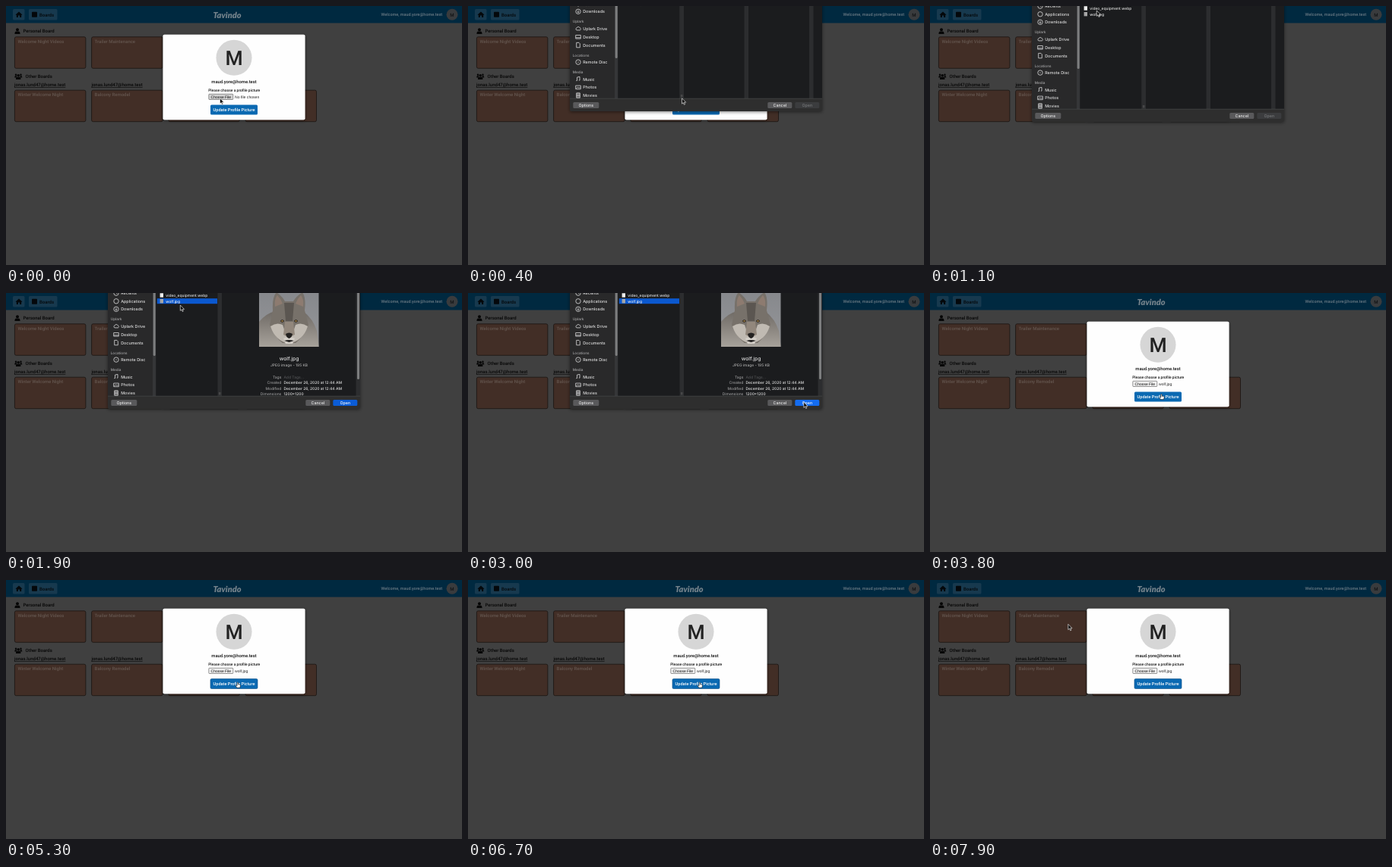
Animation of 600 by 342 pixels, one loop 8 s. Source, as an HTML page:

```html
<!DOCTYPE html>
<html lang="en">
<head>
<meta charset="utf-8">
<title>Profile picture upload</title>
<style>
  html, body { margin: 0; width: 100%; height: 100%; overflow: hidden; background: #404040; }
  svg { display: block; width: 100vw; height: 100vh; }
  text { font-family: Roboto, sans-serif; font-weight: 500; text-rendering: geometricPrecision; white-space: pre; }
  .mac text { font-family: Inter, sans-serif; }
  .arial { font-family: "Liberation Sans", sans-serif; font-weight: 400; }
  .logo { font-family: Lato, sans-serif; font-weight: 900; font-style: italic; }
</style>
</head>
<body>
<svg id="stage" viewBox="0 0 600 342" xmlns="http://www.w3.org/2000/svg">
  <defs>
    <filter id="shadow" x="-10%" y="-10%" width="120%" height="125%">
      <feDropShadow dx="0" dy="1" stdDeviation="2" flood-color="#000" flood-opacity=".5"/>
    </filter>
    <clipPath id="columns"><rect x="197" y="-60" width="269" height="196"/></clipPath>
    <clipPath id="sidebarClip"><rect x="134" y="-60" width="63" height="196"/></clipPath>
    <clipPath id="photoClip"><rect x="333" y="-7.5" width="78.5" height="78.5"/></clipPath>
    <linearGradient id="backdrop" x1="0" y1="0" x2="0" y2="1">
      <stop offset="0" stop-color="#85878b"/><stop offset="1" stop-color="#96979a"/>
    </linearGradient>
    <linearGradient id="coat" x1="0" y1="0" x2="0" y2="1">
      <stop offset="0" stop-color="#6f6a65"/><stop offset="1" stop-color="#a8a39c"/>
    </linearGradient>
  </defs>

  <g id="page">
    <rect width="600" height="342" fill="#404040"/>
    <rect width="600" height="22.5" fill="#002940"/>
    <g fill="#17394e">
      <rect x="9" y="4" width="15.5" height="14.5" rx="1.5"/>
      <rect x="30" y="4" width="37.5" height="14.5" rx="1.5"/>
    </g>
    <path d="M12.6 11.4 17 7.4l4.4 4-.6.6-.6-.5V15H18v-2.500h-2V15h-2.200v-3.500l-.6.5z" fill="#04080b"/>
    <rect x="34" y="7.700" width="7" height="7" rx=".8" fill="#04080b"/>
    <circle cx="587" cy="11.300" r="7.500" fill="#393b3d"/>
    <g id="people" fill="#060606">
      <circle cx="15" cy="31.300" r="2"/><path d="M11.500 37v-1.200q0-2.200 2.300-2.200h2.400q2.300 0 2.300 2.200V37z"/>
      <circle cx="16.200" cy="91.700" r="1.800"/><path d="M13 97v-1.200q0-2 2-2h2.400q2 0 2 2V97z"/>
      <circle cx="13" cy="90.800" r="1.200"/><circle cx="19.500" cy="90.800" r="1.200"/>
      <path d="M11.300 94.500v-.8q0-1.400 1.400-1.400h1.300v2.200zM21.200 94.500v-.8q0-1.400-1.400-1.400h-1.300v2.200z"/>
    </g>
  </g>

  <g id="modal">
    <rect x="206.500" y="37.800" width="187" height="112.500" rx="1.800" fill="#fefefe" filter="url(#shadow)"/>
    <circle cx="300" cy="68.300" r="23.500" fill="#d6d6d6"/>
    <rect id="fileButton" x="266.800" y="116.300" width="32" height="7.200" rx=".8" stroke="#555" stroke-width=".6"/>
    <rect id="update" x="269" y="130.500" width="62" height="13" rx="1.500" fill="#0a69b2"/>
  </g>

  <g id="sheet" class="mac">
    <rect x="134" y="-60" width="332" height="213" rx="2" fill="#2d2d2e" filter="url(#shadow)"/>
    <rect x="134" y="-60" width="59" height="196" fill="#29292a"/>
    <rect x="193" y="-60" width="4.300" height="196" fill="#353638"/>
    <rect x="193.700" y="-60" width="3" height="143" rx="1.500" fill="#7c7d7e"/>
    <rect x="197.300" y="-60" width="268.700" height="196" fill="#1b1c1e"/>
    <g id="sidebar" clip-path="url(#sidebarClip)"></g>
    <g id="emptyColumns" fill="#2c2d2f"></g>
    <g id="files" clip-path="url(#columns)"></g>
    <g id="preview" clip-path="url(#columns)">
      <rect x="460.500" y="-60" width="5.500" height="196" fill="#2c2d2f"/>
      <rect x="462" y="-60" width="3" height="174" rx="1.500" fill="#7c7d7e"/>
      <g clip-path="url(#photoClip)">
        <rect x="333" y="-8" width="79" height="80" fill="url(#backdrop)"/>
        <path d="M333 38Q342 27 354 24H391Q404 34 409 50L412 72H333z" fill="url(#coat)"/>
        <path d="M351 23Q350 5 356-1 364 5 367 11H378Q382 4 390-1 395 6 393 23L398 42Q391 58 381 66H364Q353 58 347 42z" fill="#77716a"/>
        <path d="M354 18Q353 7 357 3 362 8 364 14zM391 18Q392 7 388 3 383 8 381 14z" fill="#8d7b70"/>
        <path d="M366 13H379L377 37H368z" fill="#5b5651"/>
        <path d="M348 44Q356 38 364 42L368 54 372 67Q354 63 348 44zM397 44Q389 38 381 42L377 54 372 67Q391 63 397 44z" fill="#c0bab2"/>
        <path d="M367 38H378L380 55Q372 60 365 55z" fill="#92877c"/>
        <path d="M365 60Q372 56 380 60L377 67H368z" fill="#d3cec7"/>
        <path d="M368 54Q372.500 51 377 54 376 59 372.500 60 369 59 368 54zM366 63Q372.500 61 379 63L372.500 65z" fill="#232120"/>
        <g fill="#b08c49" stroke="#27221e" stroke-width="1">
          <ellipse cx="363.500" cy="37" rx="1.900" ry="1.300"/><ellipse cx="381.500" cy="37" rx="1.900" ry="1.300"/>
        </g>
      </g>
    </g>
    <path d="M134 136.200H466" stroke="#4b4c4e" stroke-width=".6"/>
    <g fill="#59595b">
      <rect x="138.300" y="141" width="34" height="8" rx="1.500"/>
      <rect x="394.300" y="141" width="32" height="8" rx="1.500"/>
      <rect id="open" x="430.300" y="141" width="32" height="8" rx="1.500"/>
    </g>
  </g>

  <g id="status"></g>

  <g id="cursor">
    <path id="arrow" d="M0 0V7.300L1.700 5.800 2.800 8.500 4 8 2.900 5.400H5.200z" fill="#080808" stroke="#f5f5f5" stroke-width=".65" stroke-linejoin="round"/>
    <path id="hand" d="M-.7.500Q0-.6.700.500V2.600L3 3Q3.800 3.300 3.700 4.300L3 7H-1L-2.700 4.300Q-2.400 3.300-.7 4.400z" fill="#fff" stroke="#111" stroke-width=".6" stroke-linejoin="round"/>
  </g>
</svg>

<script>
const $ = id => document.getElementById(id);

function add(parent, tag, attrs, content = "") {
  const node = document.createElementNS("http://www.w3.org/2000/svg", tag);
  for (const name in attrs) node.setAttribute(name, attrs[name]);
  node.textContent = content;
  return $(parent).appendChild(node);
}

const label = (parent, x, y, size, fill, content, extra = {}) =>
  add(parent, "text", { x, y, "font-size": size, fill, ...extra }, content);

const MIDDLE = { "text-anchor": "middle" };
const BOLD = { "font-weight": 700 };
const USER = "maud.yore@home.test";
const OWNER = "jonas.lund47@home.test";

function buildPage() {
  const card = (x, y, title) => {
    add("page", "rect", { x, y, width: 93.5, height: 41.5, rx: 2, fill: "#422e26", stroke: "#15100e", "stroke-width": .7 });
    label("page", x + 4, y + 7.8, 6, "#64564f", title);
  };
  label("page", 44, 13.5, 6, "#04080b", "Boards");
  label("page", 291, 15.6, 11, "#74828b", "Tavindo", { ...MIDDLE, class: "logo" });
  label("page", 574, 13.2, 5.45, "#6c7b85", "Welcome, " + USER, { "text-anchor": "end" });
  label("page", 587, 13.5, 6, "#101214", "M", MIDDLE);
  label("page", 22.5, 35.4, 6, "#060606", "Personal Board");
  label("page", 25.5, 95.2, 6, "#060606", "Other Boards");
  card(11.4, 40.8, "Welcome Night Videos");
  card(112.6, 40.8, "Trailer Maintenance");
  ["Winter Welcome Night", "Balcony Remodel", "", ""].forEach((title, i) => card(11.4 + 101.2 * i, 111.2, title));
  [11, 112.4].forEach(x => label("page", x, 106, 6, "#060606", OWNER, { "text-decoration": "underline" }));
}

function buildModal() {
  label("modal", 300, 77.7, 26.5, "#222", "M", MIDDLE);
  label("modal", 300, 101.7, 5.85, "#111", USER, MIDDLE);
  label("modal", 300.2, 112.6, 4.95, "#111", "Please choose a profile picture", MIDDLE);
  label("modal", 282.8, 121.6, 4.95, "#000", "Choose File", { ...MIDDLE, class: "arial" });
  label("modal", 301, 121.6, 5.1, "#222", "", { id: "fileName", class: "arial" });
  label("modal", 300, 139, 5.6, "#fff", "Update Profile Picture", { ...MIDDLE, ...BOLD });
}

function buildSheet() {
  const heading = (y, name) => label("sidebar", 137.7, y + 1.8, 4.7, "#a5a5a6", name, { "font-weight": 600 });
  const item = (y, name, shape) => {
    add("sidebar", "path", { d: shape, transform: `translate(145 ${y})`, fill: "none", stroke: "#c8c8c9", "stroke-width": .9 });
    label("sidebar", 151.2, y + 2, 5.4, "#dedede", name);
  };
  const disc = "M-3.200 0a3.200 3.200 0 1 0 6.400 0a3.200 3.200 0 1 0-6.400 0";
  const screen = "M-3.300-2.300H3.300V2.300H-3.300z";
  const sheetOfPaper = "M-2.300-3.200H1L2.300-1.800V3.200H-2.300z";
  item(.1, "Recents", disc + "M0-1.800V0H1.500");
  item(10.8, "Applications", disc);
  item(21.3, "Downloads", disc + "M0-1.700V1.500M-1.300.3L0 1.600 1.300.3");
  heading(34.6, "Uplark");
  item(43.9, "Uplark Drive", "M-2 2H2.300A1.600 1.600 0 0 0 2.300-1A2.400 2.400 0 0 0-2-1A1.600 1.600 0 0 0-2 2z");
  item(54.8, "Desktop", screen + "M-3 1H3");
  item(65.6, "Documents", sheetOfPaper);
  heading(78.8, "Locations");
  item(88.1, "Remote Disc", disc + "M-.7 0H.7");
  heading(101.4, "Media");
  item(110.6, "Music", "M-1.500 2V-2.500L2-3.200V1.500M-2.700 2H-1.500M.8 1.500H2");
  item(121.4, "Photos", screen + "M-2.500 1.500L-.5-.5 1 1 2 0 3 1");
  item(132.1, "Movies", "M-2.300-3.200H2.300V3.200H-2.300zM-2.300 0H2.300M-1-3.200V3.200M1-3.200V3.200");

  [278.5, 363.5, 449].forEach(x => add("emptyColumns", "rect", { x, y: -60, width: 5.5, height: 196 }));
  add("files", "rect", { x: 278.5, y: -60, width: 5.5, height: 196, fill: "#2c2d2f" });
  add("files", "path", { d: "M280.600 131V134.500M282 131V134.500", stroke: "#777", "stroke-width": .5 });
  add("files", "rect", { id: "selection", x: 198.8, y: 7.2, width: 79.2, height: 7, fill: "#0b58cf" });
  [3, 10.7].forEach(y => add("files", "rect", { x: 202.6, y: y - 2.7, width: 4.4, height: 5.4, fill: y > 5 ? "#a5a5a5" : "#eee" }));
  label("files", 210.3, 4.8, 4.95, "#e2e2e2", "video_equipment.webp");
  label("files", 210.3, 12.5, 4.95, "#eee", "wolf.jpg");

  label("preview", 372.5, 89.1, 6.8, "#dcdcdc", "wolf.jpg", { ...MIDDLE, "font-weight": 400 });
  label("preview", 372.5, 97.2, 4.9, "#aaa", "JPEG image - 195 KB", MIDDLE);
  const details = { Tags: "Add Tags…", Created: "December 26, 2020 at 12:44 AM", Modified: "December 26, 2020 at 12:44 AM", Dimensions: "1200×1200" };
  Object.entries(details).forEach(([key, value], i) => {
    const y = 112.7 + 7.45 * i;
    label("preview", 362.3, y, 4.95, "#99999a", key, { "text-anchor": "end" });
    label("preview", 365.4, y, 4.95, i ? "#e4e4e4" : "#515254", value);
  });

  label("sheet", 155.3, 146.9, 5.3, "#eee", "Options", MIDDLE);
  label("sheet", 410.3, 146.9, 5.3, "#eee", "Cancel", MIDDLE);
  label("sheet", 446.3, 146.9, 5.3, "#eee", "Open", { ...MIDDLE, id: "openLabel" });
}

buildPage();
buildModal();
buildSheet();
label("status", 2, 340.3, 5, "#999", "Waiting for localhost…", { class: "arial" });

// Rows: time, then values
const SHEET_Y = [[200, -170], [300, -90], [400, -14], [500, -2], [600, 0], [3000, 0], [3100, -35], [3200, -105], [3300, -170]];
const CURSOR = [
  [0, 281.5, 121.8], [500, 281.5, 121.8], [1100, 219.3, 6], [1600, 219.3, 6], [1800, 229.3, 16], [1900, 229.3, 16],
  [2500, 441.8, 144], [3100, 441.8, 144], [3300, 435.6, 138], [3700, 304.5, 133.6], [4100, 304.5, 133.6],
  [4300, 304.8, 135.2], [7400, 304.8, 135.2], [7900, 181.8, 58.3]
];

function sample(track, t) {
  const next = track.findIndex(row => row[0] > t);
  if (next === 0) return track[0].slice(1);
  if (next < 0) return track[track.length - 1].slice(1);
  const a = track[next - 1], b = track[next];
  const p = (t - a[0]) / (b[0] - a[0]);
  const eased = p * p * (3 - 2 * p);
  return a.slice(1).map((v, i) => v + (b[i + 1] - v) * eased);
}

const show = (id, on) => $(id).setAttribute("visibility", on ? "visible" : "hidden");
const paint = (id, fill) => $(id).setAttribute("fill", fill);

function render(t) {
  const [sheetY] = sample(SHEET_Y, t);
  const [x, y] = sample(CURSOR, t);
  const picked = t >= 1600;
  const overUpdate = t >= 3700 && t < 7500;

  $("sheet").setAttribute("transform", `translate(0 ${sheetY})`);
  $("sheet").style.display = sheetY > -160 ? "" : "none";
  show("emptyColumns", !picked);
  show("selection", picked);
  show("preview", picked);
  paint("open", !picked ? "#3b3c3e" : t >= 2900 ? "#146cf0" : "#0b5cd6");
  paint("openLabel", picked ? "#fff" : "#77787a");

  paint("fileButton", t < 3400 ? "#d3d3d3" : "#efefef");
  $("fileName").textContent = t < 3300 ? "No file chosen" : "wolf.jpg";
  $("update").setAttribute("stroke", t >= 4800 ? "#074a80" : "none");
  $("update").setAttribute("stroke-width", .6);
  show("status", t >= 4800 && t < 5300);

  $("cursor").setAttribute("transform", `translate(${x} ${y})`);
  show("arrow", !overUpdate);
  show("hand", overUpdate);
}

const LOOP = 8000, STEP = 100;
const start = performance.now();
function frame() {
  const t = (performance.now() - start) % LOOP;
  render(Math.floor(t / STEP) * STEP);
  requestAnimationFrame(frame);
}
frame();
</script>
</body>
</html>
```
